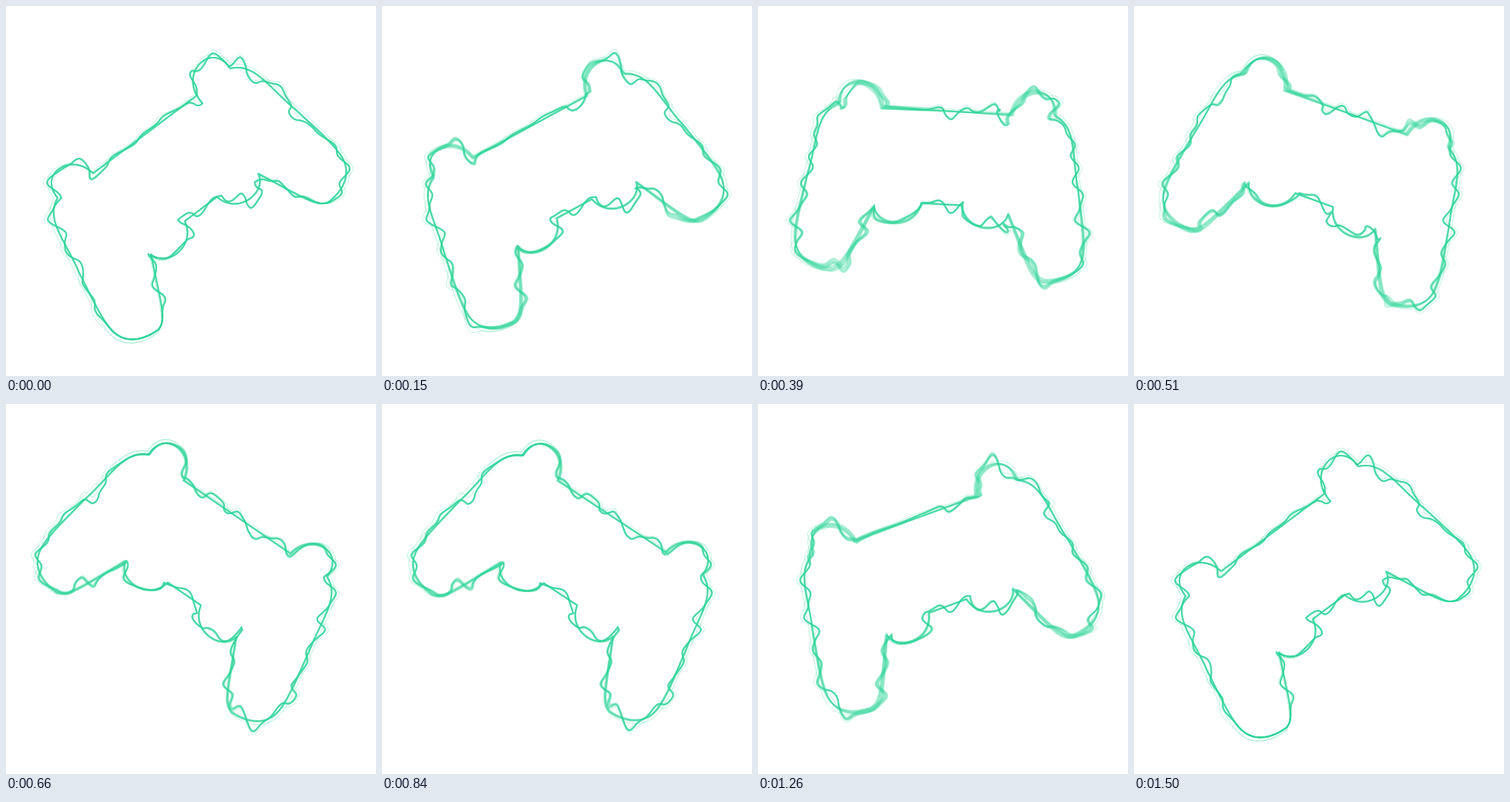
An HTML page with a canvas that plays this animation: 480 px wide and 480 px high, repeating every 1530 ms.

```html
<!DOCTYPE html>
<html lang="en">
<head>
<meta charset="utf-8">
<title>Controller</title>
<style>
  html, body { margin: 0; width: 100%; height: 100%; overflow: hidden; background: #fff; }
  canvas { display: block; width: 100vw; height: 100vh; }
</style>
</head>
<body>
<canvas id="stage" width="480" height="480"></canvas>
<script>
const ctx = document.getElementById('stage').getContext('2d');
const LOOP = 1530, STEP = 30, SWING = 750, SHUTTER = 15, SAMPLES = 6;
const MAX_ANGLE = 36.9 * Math.PI / 180;
const PIVOT = { x: 254, y: 240 }, AXIS = -15;

function bezier([ax, ay], [bx, by], [cx, cy], [dx, dy], steps = 60) {
  return Array.from({ length: steps + 1 }, (_, i) => {
    const t = i / steps, s = 1 - t;
    const mix = (a, b, c, d) => s * s * s * a + 3 * s * s * t * b + 3 * s * t * t * c + t * t * t * d;
    return [mix(ax, bx, cx, dx), mix(ay, by, cy, dy)];
  });
}

const line = (from, to) => bezier(from, from, to, to);

// Right half of the controller, with x measured from its axis.
const half = [
  ...bezier([84, -103], [90, -142], [142, -146], [140, -105]), // shoulder button
  ...bezier([140, -105], [170, -92], [165, -55], [176, -10]),  // side
  ...bezier([176, -10], [181, 20], [188, 50], [187, 71]),
  ...bezier([187, 71], [186, 100], [160, 110], [138, 110]),    // grip
  ...bezier([138, 110], [122, 106], [118, 92], [87, 26]),
  ...bezier([87, 26], [82, 52], [34, 54], [26, 18])            // thumb stick
];
const mirrored = half.map(([x, y]) => [-x, y]).reverse();
const outline = [
  ...half, ...line([26, 18], [-26, 18]),
  ...mirrored, ...line([-84, -103], [84, -103])
].map(([x, y]) => [x + AXIS, y]);

// Ripples stay fixed to the stage; each kick is [centre, height] and swings from -height to +height.
const KICKS_X = [[97, 5], [134, -8], [173, 4], [202, 5], [237, 6], [286, 9], [328, 4], [371, 7]];
const KICKS_Y = [[106, 10], [243, 5], [260, -6], [312, 14], [364, 8]];
const KICK_WIDTH = 8.5;

function ripple(kicks, p) {
  return kicks.reduce((sum, [centre, height]) => {
    const u = (p - centre) / KICK_WIDTH;
    return sum + height * u * Math.exp((1 - u * u) / 2);
  }, 0);
}

// Settles on the point whose own ripple carries (x, y) there.
function displace(x, y) {
  let qx = x, qy = y;
  for (let i = 0; i < 5; i++) {
    const nx = x + ripple(KICKS_X, qy), ny = y + ripple(KICKS_Y, qx);
    qx = (qx + nx) / 2;
    qy = (qy + ny) / 2;
  }
  return [qx, qy];
}

function angleAt(t) {
  const ease = s => s * s * (3 - 2 * s);
  const s = t < SWING ? t / SWING : Math.max(0, 2 - t / SWING);
  return MAX_ANGLE * (2 * ease(s) - 1);
}

function trace(angle, scale, rippled) {
  const c = Math.cos(angle) * scale, s = Math.sin(angle) * scale;
  ctx.beginPath();
  for (const [px, py] of outline) {
    const x = PIVOT.x + px * c - py * s;
    const y = PIVOT.y + px * s + py * c;
    ctx.lineTo(...(rippled ? displace(x, y) : [x, y]));
  }
  ctx.closePath();
  ctx.stroke();
}

function draw(t) {
  ctx.clearRect(0, 0, 480, 480);
  ctx.strokeStyle = '#30d39a';
  ctx.lineJoin = 'round';
  for (const rippled of [false, true]) {
    ctx.globalAlpha = 0.3;
    ctx.lineWidth = 1;
    trace(angleAt(t + SHUTTER / 2), 1.025, rippled);

    // Overlaid exposures blur the outline where it moves fast.
    ctx.globalAlpha = 0.3;
    ctx.lineWidth = 2;
    for (let i = 0; i < SAMPLES; i++) {
      trace(angleAt(t + SHUTTER * i / (SAMPLES - 1)), 1, rippled);
    }
  }
}

let shown = -1;
function tick() {
  const t = Math.floor(performance.now() % LOOP / STEP) * STEP;
  if (t !== shown) draw(shown = t);
  requestAnimationFrame(tick);
}
tick();
</script>
</body>
</html>
```
